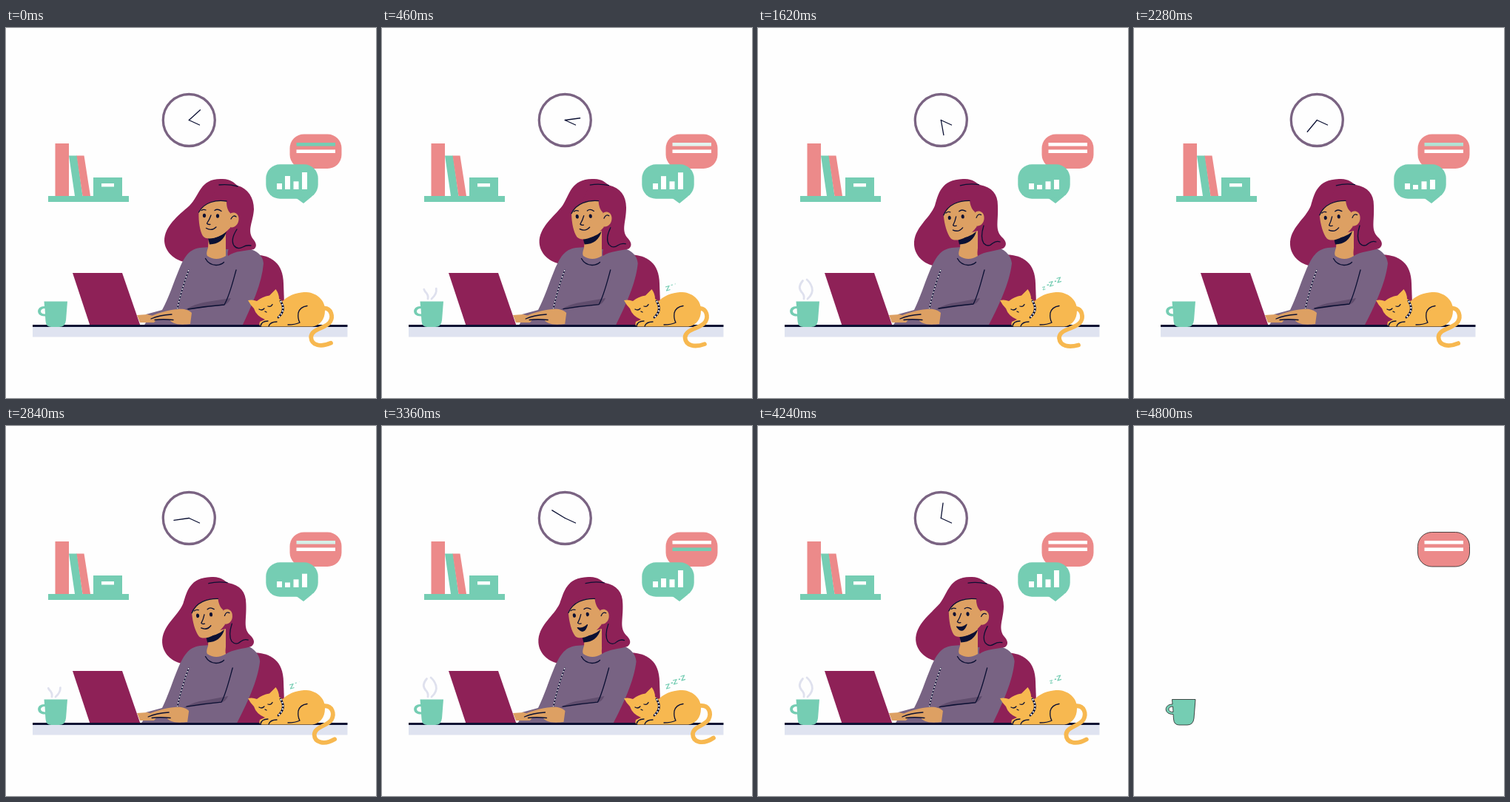
An HTML page for the animation above (4.82 s loop, 500 by 500 pixels).

```html
<!DOCTYPE html>
<html lang="en">
<head>
<meta charset="utf-8">
<title>Working from home</title>
<style>
  html, body { margin: 0; width: 100%; height: 100%; overflow: hidden; background: #fefefe; }
  svg { display: block; width: 100vw; height: 100vh; }
  .green { fill: #75cdb3; }
  .red { fill: #ec8a8a; }
  .wine { fill: #8e2157; }
  .plum { fill: #786383; }
  .shade { fill: #604d6d; }
  .skin { fill: #dda063; }
  .navy { fill: #0b1033; }
  .white { fill: #fff; }
  .cat { fill: #f7b850; }
  .line { fill: none; stroke: #0b1033; stroke-width: 1.3; stroke-linecap: round; stroke-linejoin: round; }
  .dots { fill: none; stroke: #fff; stroke-width: 1.1; stroke-dasharray: 2 2.4; }
  .steam { fill: none; stroke: #dfe1ee; stroke-width: 2.8; stroke-linecap: round; }
  .z { fill: none; stroke: #75cdb3; stroke-width: 1.3; stroke-linejoin: round; }
  .z path { transform-box: fill-box; transform-origin: center; }
  .edge .rim { stroke: #222; stroke-width: .8; }
</style>
</head>
<body>
<svg id="stage" viewBox="0 0 500 500">
  <g class="scene">
    <circle cx="247.3" cy="124.5" r="35" fill="#fefefe" stroke="#7a6382" stroke-width="3.3"/>
    <path class="line" d="M247.3 124.5L261.5 131"/>
    <path id="minute" class="line" d="M247.3 124.5V104"/>

    <path class="red" d="M66.5 156H85V227H66.5Z"/>
    <path class="green" d="M85 172.5H96L103.5 227H93Z"/>
    <path class="red" d="M95.5 172.5H105.5L114 227H103.5Z"/>
    <path class="green" d="M118 202H157V227H118ZM57 227H166V235H57Z"/>
    <path class="white" d="M129 210H146V214.5H129Z"/>
  </g>

  <rect class="red rim" x="383.5" y="143.5" width="70" height="46.5" rx="19"/>
  <rect id="row1" x="392.5" y="155" width="52.5" height="4.6"/>
  <rect id="row2" x="392.5" y="164.4" width="52.5" height="4.6"/>

  <g class="scene">
    <rect class="green" x="351.3" y="184.3" width="70.4" height="46.5" rx="19"/>
    <path class="green" d="M391 229L402 237L413 228Z"/>
    <g id="bars" class="white">
      <rect x="366" width="7"/><rect x="377" width="7"/><rect x="388.5" width="7"/><rect x="400" width="7"/>
    </g>

    <path class="wine" d="M330 306C360 306 374 318 375 345L377 402H300Z"/>
    <path id="back" class="wine"/>
    <path id="body" class="plum"/>
    <path id="fold" class="shade"/>
    <path id="sleeve" class="line"/>
    <path class="line" d="M247 327C240 345 235 363 231 382"/>
    <path class="dots" d="M247 327C240 345 235 363 231 382"/>
    <path class="skin" d="M274 280L273 297Q270 305 272 308Q284 316 297 308V274Z"/>
    <path id="chin" class="navy" d="M273 284Q288 284 298 275Q293 292 275 292.5Z"/>
    <path class="line" d="M269.5 311.5Q274 320 284 320.5Q291 320 294.5 316.5"/>
    <path id="lock" class="wine"/>
    <path id="strand" class="line"/>
    <g id="face">
      <path class="skin" d="M298 234C284 232 268 235 260.5 249C260 262 262 274 266 281C271 288 289 285 303 270L303 250C299 246 298 240 298 234Z"/>
      <path class="skin" d="M301 253C305 247 314 249 314.500 257C315 265 309 271 302 269Z"/>
      <path class="line" d="M260.5 249C268 235 284 232 298 234M288 212Q300 210.5 313 214M304 258Q307 252 311 255M277 253Q275 259 271.5 264Q273 266 276 265.3M264 246.5Q267 244.5 270 246M282 246.5Q286 243.5 291 247.5"/>
      <ellipse class="navy" cx="268" cy="253.5" rx="2.1" ry="2.8"/>
      <ellipse class="navy" cx="286" cy="254" rx="2.1" ry="2.8"/>
      <path id="mouth" class="line"/>
    </g>

    <path class="wine" d="M90 331H157L181.500 402H113.5Z"/>
    <path class="skin" d="M177 388L191 387L206 391L200 398H181Z"/>
    <g id="hand">
      <path class="plum" d="M189 398H252V403H186Z"/>
      <path class="skin" d="M251 385C247 380 238 379 232 380C219 381 206 385 197 389C191 392 195 395 203 394L221 394C224 399 231 402 249 400Z"/>
      <path class="line" d="M196 393Q207 388 224 387M201 394.5Q212 393 226 394.5"/>
    </g>

    <path class="navy" d="M36 401H461.5V404H36Z"/>
    <path fill="#dfe3f0" d="M36 404H461.5V417.5H36Z"/>

    <path id="tail" fill="none" stroke="#f7b850" stroke-width="5.8" stroke-linecap="round"/>
    <path class="cat" d="M327 368Q333 366.5 339 369Q346 363 356 361.5L364.5 353Q369 359 369 366L374 369C384 359 397 357 406 357C422 358 432 370 431 382C431 394 424 402 414 403.5H346Q341 403 343 397L350 394Q338 389 335 379Q330 374 327 368Z"/>
    <path class="line" d="M371 369Q379 381 368 391" style="stroke-width:2.8"/>
    <path class="dots" d="M371 369Q379 381 368 391" style="stroke-width:2"/>
    <path class="line" d="M342 380Q346 382.5 349 379M354 376Q358 377.5 360 373.5M350 383L352 384M407 375.5Q397 377 395 385Q394 393 397 398Q391 401 381 401M344 403Q345 396 354 396M355 403Q357 397 366 397"/>
    <g id="zs" class="z">
      <path d="M383 350L388 348.5L384.5 355L389.5 353.5"/>
      <path d="M390.5 347.5L393 347"/>
      <path d="M393 344L398 342.5L394.5 349L399.5 347.5"/>
      <path d="M400.8 342.5L403 342"/>
      <path d="M403.5 338.5L408.5 337L405 343.8L410 342.3"/>
    </g>
    <path class="steam" pathLength="1" d="M62 366Q63 361 59 357Q53 350 60.5 341.500"/>
    <path class="steam" pathLength="1" d="M67 366Q75 359 73 351Q71 344 66 340"/>
  </g>

  <path class="green rim" fill-rule="evenodd" d="M51.5 369.5H83L81 395Q80 404 72 404H61Q54 404 53.5 396L53 389.5C40 390 40 376 52 376ZM52.5 379C45 379 45 387 53 386.5Z"/>
</svg>
<script>
const LOOP = 4820, CYCLE = 2400, CUT = 4800;
const $ = id => document.getElementById(id);
const all = sel => [...document.querySelectorAll(sel)];
const scene = all('.scene'), bars = [...$('bars').children], zs = [...$('zs').children], steam = all('.steam');

// Smooth curve through [time, value] stops, flat at each extreme, wrapping round the loop.
function track(...keys) {
  const n = keys.length;
  const key = i => {
    const k = keys[(i + n) % n];
    return [k[0] + Math.floor(i / n) * LOOP, k[1]];
  };
  const slope = (a, b) => (b[1] - a[1]) / (b[0] - a[0]);
  const tangent = i => {
    const l = slope(key(i - 1), key(i)), r = slope(key(i), key(i + 1));
    return l * r <= 0 ? 0 : 2 * l * r / (l + r);
  };
  return t => {
    let i = n - 1;
    while (i > 0 && keys[i][0] > t) i--;
    const a = key(i), b = key(i + 1), h = b[0] - a[0], u = (t - a[0]) / h, v = 1 - u;
    return v * v * (1 + 2 * u) * a[1] + u * u * (3 - 2 * u) * b[1]
      + h * u * v * (v * tangent(i) - u * tangent(i + 1));
  };
}

const ramp = (t, a, b) => {
  const u = Math.min(1, Math.max(0, (t - a) / (b - a)));
  return u * u * (3 - 2 * u);
};

const lean = track([0, 0], [880, .9], [1620, 1], [2280, 1], [3360, .88], [4240, .27]);
const wag = track([0, .4], [880, .06], [1300, 0], [1620, 0], [2280, .34], [3420, 1], [4240, .72]);
const barTops = [
  () => 210,
  track([0, 200], [400, 200], [880, 205.5], [1450, 212], [2700, 212], [3360, 206], [4000, 200]),
  () => 207.3,
  track([0, 195], [400, 195], [880, 202], [1300, 205], [2450, 205], [3200, 195])
];

// Makes a function that blends the path of an element between two poses.
function morph(id, a, b) {
  const ends = b.match(/[\d.]+/g);
  return w => {
    let i = 0;
    $(id).setAttribute('d', a.replace(/[\d.]+/g, n => (+n + (ends[i++] - n) * w).toFixed(2)));
  };
}

const figure = [
  morph('back',
    'M290 204C262 204 262 226 248 240C232 254 214 268 214 288C215 303 228 313 240 316L304 306L320 240Z',
    'M277 204C247 205 244 224 239 240C232 258 210 270 211 293C212 308 224 318 236 321L302 306L310 240Z'),
  morph('body',
    'M262 297C246 299 240 312 234 326C226 345 220 365 211 381L189 387L195 403L319 403C332 375 346 345 348 318C347 306 338 301 328 298L298 299L275 296Z',
    'M262 297C246 299 240 311 233 326C225 345 219 365 211 381L189 387L195 403L311 403C325 376 340 345 343 318C342 308 335 301 326 297L298 299L275 296Z'),
  morph('fold',
    'M241 381Q257 372 272 370L304 365Q300 373 295 374.5Z',
    'M239 381Q255 372 268 371L300 365Q297 372 291 373.5Z'),
  morph('sleeve',
    'M311 327C306 345 302 362 295 374Q270 376 246 380',
    'M306 327C301 345 297 362 291 373Q268 375 244 379'),
  morph('lock',
    'M290 204C303 203 308 209 313 213C327 217 335 229 335 245C334 262 326 272 333 284C338 290 340 295 335 299C325 301 309 301 300 308C298 300 306 292 305 270L299 240L298 234L275 236Z',
    'M277 204C290 203 294 209 300 212C316 215 324 224 324 240C325 262 320 272 329 282C336 288 337 294 331 298C322 301 306 302 297 308C295 300 301 288 296 265L288 242L285 234L262 240Z'),
  morph('strand',
    'M312 272Q303 286 308 294Q313 300 320 296Q325 293 331 294',
    'M305 267Q300 283 305 291Q311 297 317 291Q322 287 327 289')
];
const tail = morph('tail',
  'M430 379C438 380 440 391 436 397C430 407 407 406 407 419C408 430 420 432 433 428.5',
  'M430 378C442 377 446 388 441 397C436 405 421 406 420 416C420 428 434 431 448 421.5');

const mix = k => `rgb(${[117, 205, 179].map(c => Math.round(255 + (c - 255) * k))})`;

function draw(t) {
  const p = t % CYCLE, w = lean(t), ended = t >= CUT;
  scene.forEach(g => g.style.display = ended ? 'none' : '');
  $('stage').classList.toggle('edge', ended);

  $('minute').setAttribute('transform', `rotate(${47.5 + t * .0755} 247.3 124.5)`);
  $('row1').style.fill = mix(ended ? 0 : 1 - ramp(p, 250, 550) + ramp(p, 2140, 2400));
  $('row2').style.fill = mix(ended ? 0 : ramp(p, 450, 750) - ramp(p, 1150, 1450));
  bars.forEach((bar, i) => {
    const y = barTops[i](t);
    bar.setAttribute('y', y);
    bar.setAttribute('height', 218 - y);
  });

  figure.forEach(pose => pose(w));
  tail(wag(t));
  $('face').setAttribute('transform', `translate(${-2.2 * w} 0) rotate(${-7.3 * w} 288 310)`);
  $('chin').setAttribute('transform', `translate(${-3 * w} 0)`);
  $('hand').setAttribute('transform', `translate(${-4 * w} 0)`);
  const open = ramp(t, 2800, 3100) - ramp(t, 4400, 4650);
  $('mouth').setAttribute('d', `M270.5 270.5Q278 ${275 + open * 7} 284 ${269 - open}Q278 ${275 - open * 2} 270.5 270.5Z`);
  $('mouth').style.fill = open > .05 ? '#0b1033' : 'none';

  zs.forEach((z, i) => {
    const k = ramp(p, 200 + i * 100, 400 + i * 100) - ramp(p, 1540 + i * 110, 1760 + i * 110);
    z.style.transform = `scale(${k})`;
  });
  const drawn = ramp(p, 150, 750), gone = ramp(p, 1850, 2240);
  steam.forEach(s => {
    s.style.strokeDasharray = `${Math.max(0, drawn - gone)} 2`;
    s.style.strokeDashoffset = -gone;
    s.style.opacity = drawn - gone > .01 ? 1 : 0;
  });
}

const start = performance.now();
(function tick() {
  draw((performance.now() - start) % LOOP);
  requestAnimationFrame(tick);
})();
</script>
</body>
</html>
```
